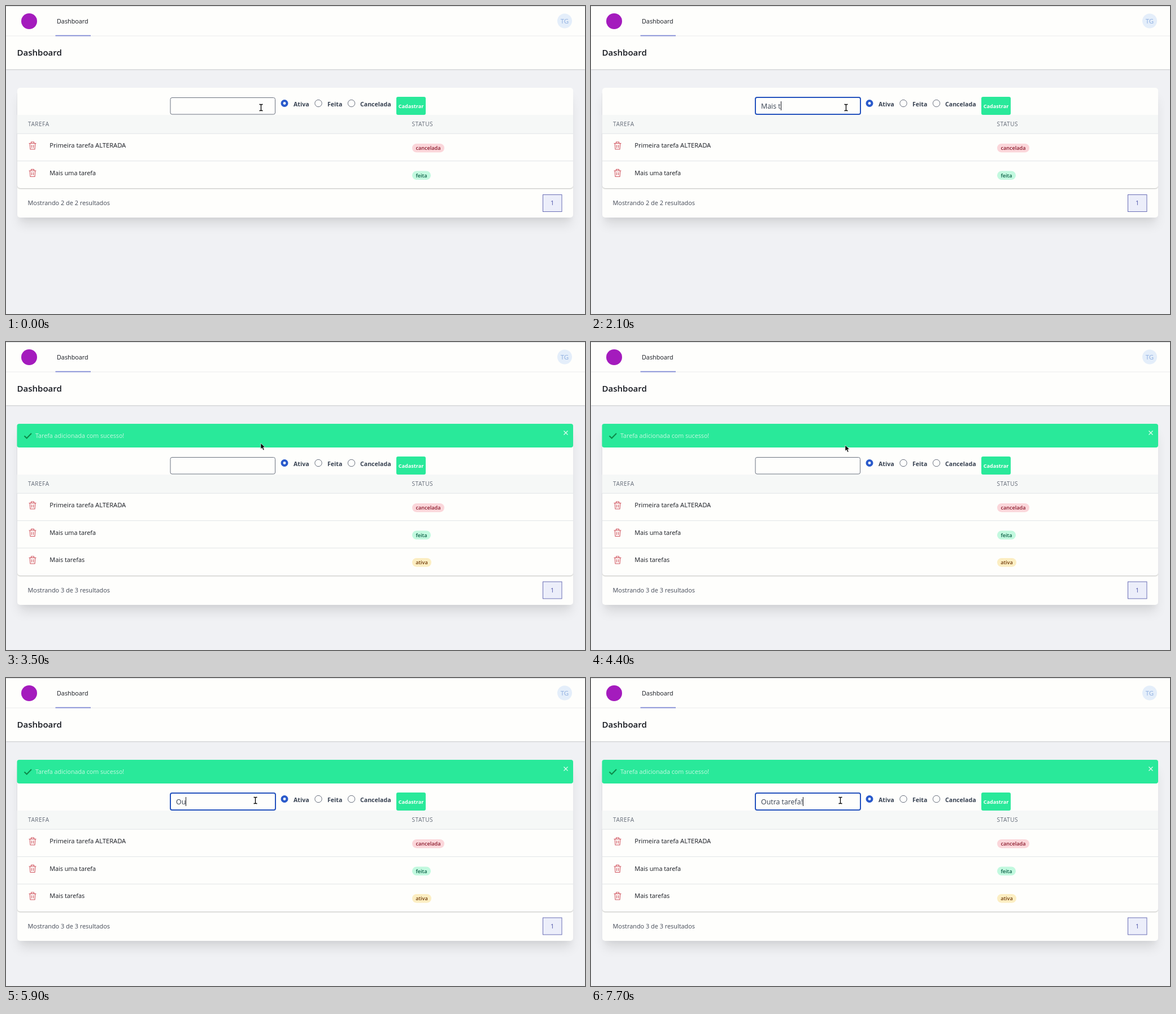
Write an HTML page that moves like this. It is 1025 px wide and 546 px high and loops after 8000 ms.

```html
<!DOCTYPE html>
<html lang="pt">
<head>
<meta charset="utf-8">
<title>Dashboard</title>
<style>
  html, body { margin: 0; width: 100%; height: 100%; overflow: hidden; background: #f0f1f4; }
  #stage { position: relative; width: 1025px; height: 546px; overflow: hidden; background: #f0f1f4; }
  #stage > * { position: absolute; box-sizing: border-box; }
  svg { left: 0; top: 0; }
  #top { left: 0; top: 0; width: 1025px; height: 112px; background: #fefefc;
    border-top: 1px solid #dadbdc; box-shadow: 0 1px 2px rgba(0,0,0,.16); }
  #card, #table { left: 19.5px; top: 145px; width: 984.5px; background: #fefefc; border-radius: 5px; }
  #card { box-shadow: 0 16px 20px -4px rgba(0,0,0,.1), 0 8px 8px -4px rgba(0,0,0,.04); }
  #table { box-shadow: 0 1px 2px rgba(0,0,0,.26); clip-path: inset(10px 0 -4px 0); }
  text { font: 400 10.9px "Open Sans", "Noto Sans", sans-serif; fill: #15181f; white-space: pre; }
  .head { font-size: 10.1px; letter-spacing: .5px; fill: #646b78; }
  .label { font-size: 10.6px; font-weight: 700; fill: #374151; }
  .badge { font-size: 9.1px; font-weight: 600; }
  .icon { fill: none; stroke: #d0545e; stroke-width: 1.1; stroke-linejoin: round; stroke-linecap: round; }
  .radio { fill: #fefefc; stroke: #6b7280; }
  .rule { fill: #e2e4e6; }
  .mid { text-anchor: middle; }
</style>
</head>
<body>
<div id="stage">
  <div id="top"></div>
  <div id="card"></div>
  <div id="table"></div>
  <svg width="1025" height="546" viewBox="0 0 1025 546">
    <rect class="rule" y="52.5" width="1025" height="1" style="fill:#ededee"/>
    <circle cx="41" cy="27" r="14" fill="#a41bbd"/>
    <text x="90" y="31" style="font-size:10.8px">Dashboard</text>
    <rect x="87.5" y="51.7" width="62.5" height="1.7" fill="#7c86d4"/>
    <circle cx="989" cy="26.5" r="13" fill="#e4eefa"/>
    <text class="mid" x="989" y="31" style="font-size:11.5px;fill:#8eaee0">TG</text>
    <text x="19.5" y="88" style="font-size:15px;font-weight:600">Dashboard</text>

    <g id="alert">
      <rect x="19.5" y="145" width="984.5" height="42" rx="4" fill="#29e99a"/>
      <path d="M32.5 166.5l4.2 4L45 162" fill="none" stroke="#0d8a4a" stroke-width="2"/>
      <text x="52" y="169.5" style="font-size:10.7px;fill:#c6f8e1">Tarefa adicionada com sucesso!</text>
      <path d="M987.5 157.500l7 7m0-7l-7 7" stroke="#e2fbf0" stroke-width="1.2"/>
    </g>

    <g id="panel">
      <rect id="field" fill="#fefefc"/>
      <text id="typed" x="301" y="181.500" style="font-size:12.4px;fill:#374151"></text>
      <rect id="caret" y="169" width="1" height="16" fill="#15181f"/>
      <circle cx="493" cy="172.500" r="6.500" fill="#2a5acb"/>
      <circle cx="493" cy="172.500" r="2.400" fill="#fefefc"/>
      <circle class="radio" cx="553" cy="172.500" r="6.200"/>
      <circle class="radio" cx="611.500" cy="172.500" r="6.200"/>
      <text class="label" x="509" y="177.500">Ativa</text>
      <text class="label" x="569" y="177.500">Feita</text>
      <text class="label" x="627" y="177.500">Cancelada</text>
      <rect x="691" y="161" width="52" height="32" rx="3" fill="#29e99a"/>
      <text class="mid" x="717" y="180.500" style="font-size:9.1px;font-weight:700;fill:#fefefc">Cadastrar</text>
      <rect x="19.500" y="193" width="984.500" height="33" fill="#f6f8f7"/>
      <text class="head" x="39" y="213.300">TAREFA</text>
      <text class="head" x="718.500" y="213.300">STATUS</text>
      <g id="rows"></g>
    </g>

    <g id="foot">
      <text id="count" x="38.500" y="353" style="fill:#434956"></text>
      <rect x="950.500" y="334.500" width="33.500" height="30" fill="#eceefa" stroke="#6a6eb6"/>
      <text class="mid" x="967.200" y="353" style="fill:#4c50a8">1</text>
    </g>

    <path id="arrow" d="M0 0v10.200l2.400-2.200 1.800 4.200 1.900-.8-1.800-4.100h3.300z"
      fill="#000" stroke="#fff" stroke-width=".6"/>
    <path id="beam" d="M-3-5.500h2l1 .8 1-.8h2M0-4.700v9.400M-3 5.500h2l1-.8 1 .8h2"
      fill="none" stroke="#000" stroke-width="1.300"/>
  </svg>
</div>
<script>
const LOOP = 8000, ADDED = 3500, SHIFT = 42, ROW = 48.5;
const $ = id => document.getElementById(id);

// task, text size, status, badge width, badge fill, badge ink
const tasks = [
  ['Primeira tarefa ALTERADA', 11.2, 'cancelada', 57, '#fbd6da', '#8a1a2c'],
  ['Mais uma tarefa', 10.8, 'feita', 33, '#c2f9df', '#0b5f46'],
  ['Mais tarefas', 10.9, 'ativa', 34, '#fceec2', '#74400f']
];

// time, text, caret shown, focused
const typing = [
  [0, '', 0, 0], [400, '', 1, 1], [1200, '', 0, 1], [1400, 'M', 1, 1],
  [1600, 'Ma', 1, 1], [1700, 'Mai', 1, 1], [1800, 'Mais', 1, 1], [1900, 'Mais ', 1, 1],
  [2100, 'Mais t', 1, 1], [2200, 'Mais ta', 1, 1], [2400, 'Mais tar', 1, 1],
  [2500, 'Mais tare', 1, 1], [2600, 'Mais taref', 1, 1], [2700, 'Mais tarefa', 1, 1],
  [3000, 'Mais tarefas', 1, 1], [ADDED, '', 0, 0], [5000, '', 1, 1], [5400, '', 0, 1],
  [5600, 'O', 1, 1], [5900, 'Ou', 1, 1], [6000, 'Out', 1, 1], [6100, 'Outra', 1, 1],
  [6300, 'Outra t', 1, 1], [6400, 'Outra ta', 1, 1], [6800, 'Outra tare', 1, 1],
  [7100, 'Outra tarefa', 1, 1], [7700, 'Outra tarefa!', 1, 1]
];

// time, pointer shape, x, y
const pointer = [
  [0, 'beam', 451.5, 180], [3200, 'arrow', 451, 179.5], [4400, 'arrow', 450, 183],
  [4500, 'arrow', 447, 194], [4600, 'beam', 443, 211], [4700, 'beam', 442.5, 217],
  [5100, 'beam', 441.5, 217]
];

$('rows').innerHTML = tasks.map(([name, size, status, width, fill, ink], i) => `
  <g transform="translate(0 ${i * ROW})">
    <rect class="rule" x="19.5" y="225.7" width="984.5" height="1"/>
    <path class="icon" d="M41 243.500h12M44.500 243v-2h5v2M42.300 243.500l.7 10.500h8l.7-10.500M45.500 246.500v4.500M48.500 246.500v4.500"/>
    <text x="77.300" y="251" style="font-size:${size}px">${name}</text>
    <rect x="719" y="244" width="${width}" height="15.500" rx="7.750" fill="${fill}"/>
    <text class="badge mid" x="${719 + width / 2}" y="255" style="fill:${ink}">${status}</text>
  </g>`).join('');
const lastRow = $('rows').lastElementChild;

const stepAt = (steps, t) => steps.findLast(s => s[0] <= t);
const show = (el, on) => { el.style.display = on ? '' : 'none'; };
const move = (id, x, y) => $(id).setAttribute('transform', `translate(${x} ${y})`);
const setAll = (el, attrs) => Object.entries(attrs).forEach(([k, v]) => el.setAttribute(k, v));

function drawLayout(added) {
  const down = added ? SHIFT : 0, grow = added ? SHIFT + ROW : 0;
  show($('alert'), added);
  show(lastRow, added);
  move('panel', 0, down);
  move('foot', 0, grow);
  $('card').style.height = 230 + grow + 'px';
  $('table').style.height = 178 + grow + 'px';
  const n = added ? 3 : 2;
  $('count').textContent = `Mostrando ${n} de ${n} resultados`;
}

function drawField([, text, caret, focused]) {
  setAll($('field'), focused
    ? { x: 291, y: 162, width: 186, height: 30, rx: 3, stroke: '#2452bd', 'stroke-width': 2 }
    : { x: 291, y: 162.5, width: 185.5, height: 29.5, rx: 3, stroke: '#6b7280', 'stroke-width': 1 });
  $('typed').textContent = text;
  const end = text ? $('typed').getComputedTextLength() : 0;
  $('caret').setAttribute('x', Math.round(301 + end));
  show($('caret'), caret);
}

function drawPointer([, shape, x, y]) {
  for (const id of ['arrow', 'beam']) show($(id), id === shape);
  move(shape, x, y);
}

const start = performance.now();
function frame() {
  const t = (performance.now() - start) % LOOP;
  drawLayout(t >= ADDED);
  drawField(stepAt(typing, t));
  drawPointer(stepAt(pointer, t));
  requestAnimationFrame(frame);
}
frame();
</script>
</body>
</html>
```
